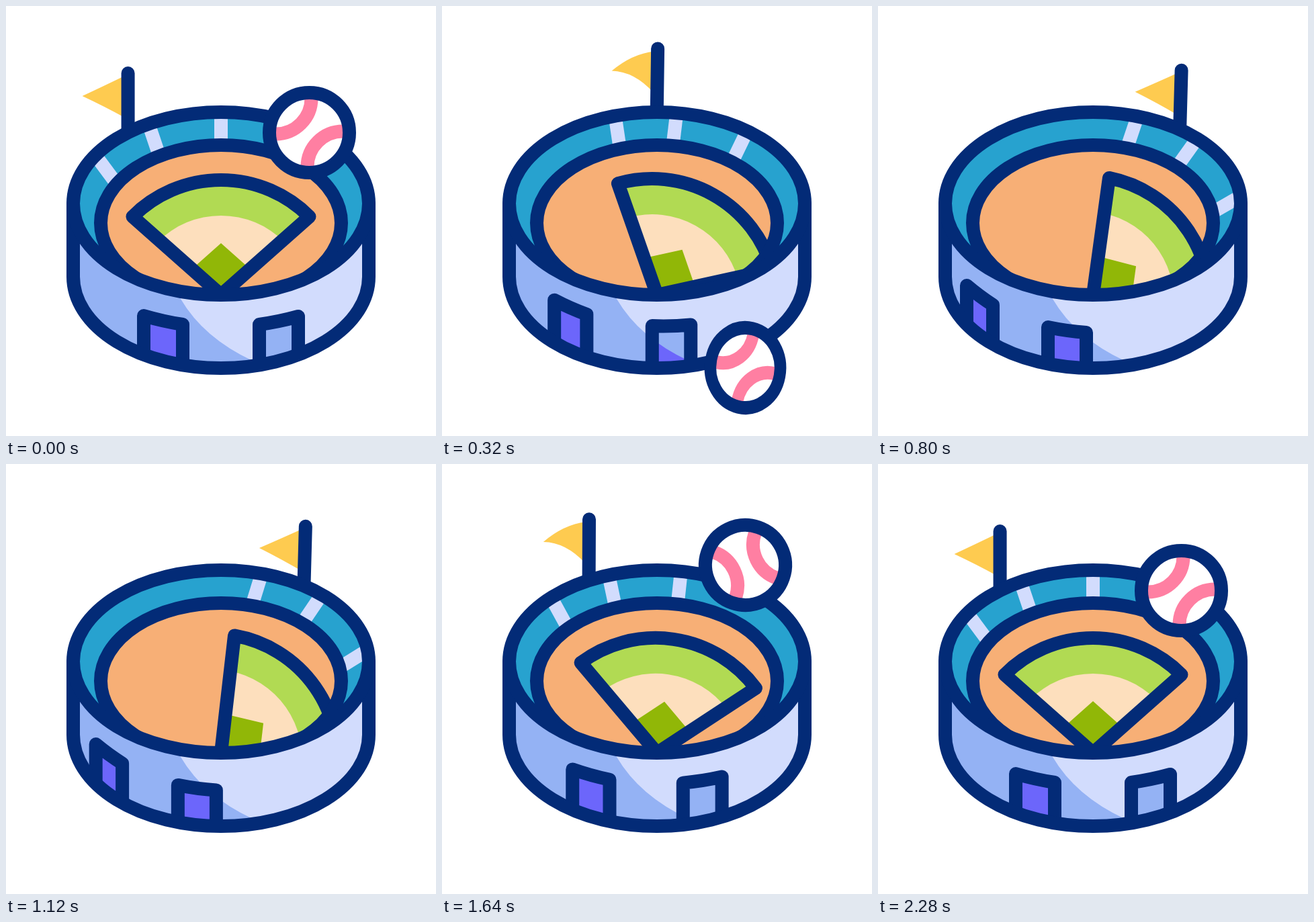
These frames come from a looping animation (640x640 px, 2.4 s). An HTML page with a canvas:

```html
<!DOCTYPE html>
<html lang="en">
<head>
<meta charset="utf-8">
<title>Baseball stadium</title>
<style>
  html, body { margin: 0; width: 100%; height: 100%; overflow: hidden; background: #fff; }
  canvas { display: block; width: 100vmin; height: 100vmin; }
</style>
</head>
<body>
<canvas id="stage" width="640" height="640"></canvas>
<script>
const ctx = document.getElementById('stage').getContext('2d');
const LOOP = 2400, STEP = 40, END = 2280, RAD = Math.PI / 180;
const NAVY = '#032b77', LIGHT = '#d2dcfd', SHADE = '#94b2f4', PURPLE = '#6c66fb',
  TEAL = '#27a2cf', CLAY = '#f7af76', GRASS = '#b1da53', SAND = '#fddfbd',
  INFIELD = '#91b707', YELLOW = '#fecb50', PINK = '#ff7fa2';

// Monotone cubic curve through [time, value] keys
function curve(keys) {
  const slope = i => (keys[i + 1][1] - keys[i][1]) / (keys[i + 1][0] - keys[i][0]);
  const last = keys.length - 1;
  const tangent = i => {
    if (i === 0 || i === last) return 0;
    const a = slope(i - 1), b = slope(i);
    return a * b <= 0 ? 0 : 2 * a * b / (a + b);
  };
  return t => {
    if (t <= keys[0][0]) return keys[0][1];
    if (t >= keys[last][0]) return keys[last][1];
    let i = 0;
    while (t > keys[i + 1][0]) i++;
    const [t0, v0] = keys[i], [t1, v1] = keys[i + 1];
    const h = t1 - t0, u = (t - t0) / h, w = 1 - u;
    return v0 * (1 + 2 * u) * w * w + v1 * u * u * (3 - 2 * u)
      + h * u * w * (tangent(i) * w - tangent(i + 1) * u);
  };
}

const turn = curve([[0, 0], [110, -.065], [320, .518], [560, .874], [800, 1], [940, 1.01],
  [1120, .977], [1440, .642], [1640, .147], [1680, .1], [1860, .03], [END, 0]]);
const flutter = curve([[0, 0], [320, 6], [640, 0], [1360, 0], [1440, 1], [1640, 6], [1960, 0]]);
const roll = curve([[0, 0], [320, 12], [480, 20], [1160, 35], [1440, -27], [1640, -71],
  [1840, -120], [END, -180]]);
const squash = curve([[1300, 1], [1360, .86], [1440, .955], [1540, 1]]);
const slim = curve([[0, 1], [320, .875], [480, .86], [1280, .88], [1360, 1.04], [1440, 1]]);

const mix = (a, b, p) => a + (b - a) * p;

function ellipse(cx, cy, rx, ry) {
  ctx.beginPath();
  ctx.ellipse(cx, cy, rx, ry, 0, 0, 7);
}
function poly(points, close = true) {
  ctx.beginPath();
  points.forEach(([x, y]) => ctx.lineTo(x, y));
  if (close) ctx.closePath();
}
function fill(color) { ctx.fillStyle = color; ctx.fill(); }
function stroke(color = NAVY) { ctx.strokeStyle = color; ctx.stroke(); }
function layer(draw) { ctx.save(); draw(); ctx.restore(); }

function wallPath() {
  ctx.beginPath();
  ctx.moveTo(100, 294);
  ctx.lineTo(100, 403);
  ctx.ellipse(320, 403, 220, 136, 0, Math.PI, 0, true);
  ctx.lineTo(540, 294);
}
function shadePath() {
  ctx.beginPath();
  ctx.moveTo(90, 280);
  ctx.lineTo(254, 425);
  ctx.lineTo(260, 436);
  ctx.quadraticCurveTo(294, 494, 367, 528);
  ctx.lineTo(400, 560);
  ctx.lineTo(90, 560);
  ctx.closePath();
}
const rim = () => ellipse(320, 294, 220, 136);
const field = () => ellipse(320, 323, 179, 116);

function door(x1, y1, x2, y2) {
  const shape = () => {
    ctx.beginPath();
    ctx.moveTo(x1, 570);
    ctx.lineTo(x1, y1);
    ctx.quadraticCurveTo((x1 + x2) / 2, (y1 + y2) / 2 + 2, x2, y2);
    ctx.lineTo(x2, 570);
  };
  shape();
  fill(SHADE);
  layer(() => {
    shadePath();
    ctx.clip();
    shape();
    fill(PURPLE);
  });
  shape();
  stroke();
}

function wall(p) {
  layer(() => {
    wallPath();
    ctx.clip();
    fill(LIGHT);
    shadePath();
    fill(SHADE);
    door(mix(205, 132, p), mix(461, 416, p), mix(263, 171, p), mix(474, 445, p));
    door(mix(377, 253, p), mix(474, 478, p), mix(435, 310, p), mix(462, 486, p));
  });
  wallPath();
  stroke();
}

function stripe(start, sweep, bend, p) {
  const a = start + sweep * p + bend * p * (1 - p);
  layer(() => {
    ctx.translate(320 + 199.5 * Math.sin(a * RAD), 308.5 - 126 * Math.cos(a * RAD));
    ctx.rotate((.62 * a + 8 * p * p) * RAD);
    ctx.fillStyle = LIGHT;
    ctx.fillRect(-10, -26, 20, 52);
  });
}

function diamond(p) {
  const sector = () => {
    ctx.beginPath();
    ctx.moveTo(0, 0);
    ctx.arc(0, 15, 186, -135 * RAD, -45 * RAD);
    ctx.closePath();
  };
  ctx.translate(320, 430);
  ctx.rotate(56.3 * p * RAD);
  sector();
  fill(GRASS);
  layer(() => {
    ctx.clip();
    ellipse(0, 15, 133, 133);
    fill(SAND);
    poly([[0, -77], [-54, -29], [0, 20], [54, -29]]);
    fill(INFIELD);
  });
  sector();
  stroke();
}

function bowl(p) {
  layer(() => {
    rim();
    ctx.clip();
    fill(TEAL);
    stripe(-59, 76, 10, p);
    stripe(-30, 74.5, -4, p);
    stripe(0, 84, -22, p);
    field();
    fill(CLAY);
    layer(() => {
      ctx.clip();
      diamond(p);
    });
    field();
    stroke();
  });
  rim();
  stroke();
}

function flag(p, bow) {
  const a = (57 * p - 29.4) * RAD;
  layer(() => {
    ctx.translate(320.5 + 283 * Math.sin(a), 63.5 + 283 * (1 - Math.cos(a)));
    ctx.rotate(1.6 * p * RAD);
    ctx.beginPath();
    ctx.moveTo(-5, 4);
    ctx.quadraticCurveTo(-38, 20 - 2 * bow, -68, 34);
    ctx.quadraticCurveTo(-34, 50 - 2.6 * bow, -5, 66);
    ctx.closePath();
    fill(YELLOW);
    poly([[0, 0], [0, 88]], false);
    stroke();
  });
}

function ballY(t) {
  const rest = 188.5;
  if (t < 700) return rest + 350 * (Math.max(0, t - 60) / 260) ** 2;
  if (t < 1200) return -100;
  if (t < 1360) return mix(-80, rest, ((t - 1200) / 160) ** 2);
  if (t < 1720) return rest - 55 * (1 - ((t - 1540) / 180) ** 2);
  return rest;
}

function ball(t) {
  layer(() => {
    ctx.translate(451.5, ballY(t));
    ctx.scale(slim(t), squash(t));
    ctx.rotate(roll(t) * RAD);
    ellipse(0, 0, 59.5, 59.5);
    fill('#fff');
    layer(() => {
      ctx.clip();
      for (const side of [-1, 1]) {
        ellipse(50 * side, 51 * side, 53, 53);
        stroke(PINK);
      }
    });
    ellipse(0, 0, 59.5, 59.5);
    stroke();
  });
}

function draw(t) {
  const p = turn(t);
  ctx.fillStyle = '#fff';
  ctx.fillRect(0, 0, 640, 640);
  ctx.lineWidth = 20;
  ctx.lineCap = ctx.lineJoin = 'round';
  flag(p, flutter(t));
  wall(p);
  bowl(p);
  ball(t);
}

let start;
function tick(now) {
  start ??= now;
  const t = (now - start) % LOOP;
  draw(Math.min(END, Math.floor(t / STEP) * STEP));
  requestAnimationFrame(tick);
}
draw(0);
requestAnimationFrame(tick);
</script>
</body>
</html>
```
